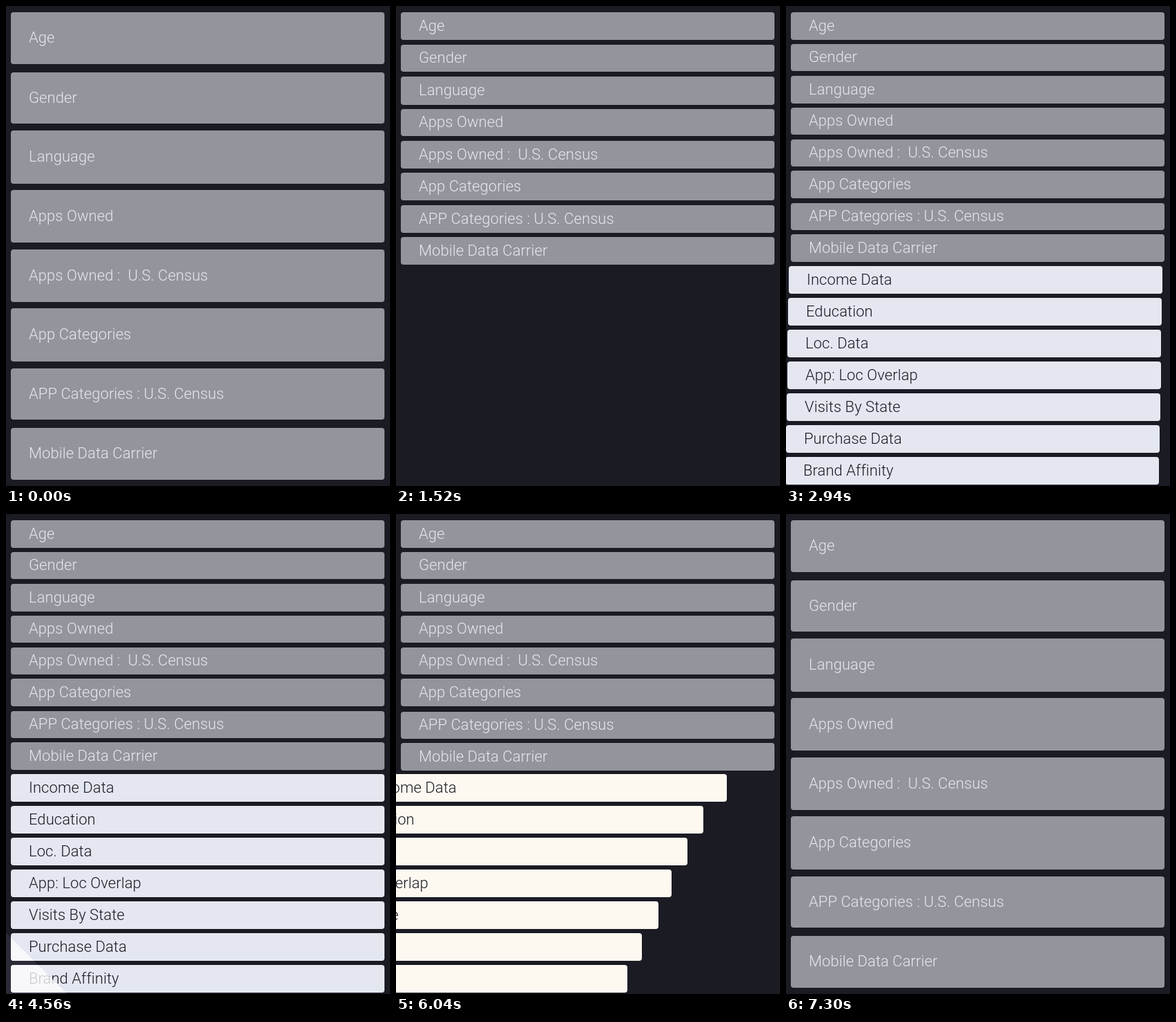
An HTML page with a canvas for the animation above (7.44 s loop, 556 by 694 pixels).

```html
<!DOCTYPE html>
<html lang="en">
<head>
<meta charset="utf-8">
<style>
html, body { margin: 0; height: 100%; overflow: hidden; background: #1b1b24; }
canvas { display: block; }
</style>
</head>
<body>
<canvas id="stage" width="556" height="694"></canvas>
<script>
const ctx = document.getElementById('stage').getContext('2d');
const LOOP = 7440, LEFT = 7, WIDTH = 541;
const BG = '#1b1b24', GREY = '#93959d', PALE = '#e4e7f0', CREAM = '#fdf8f0';

const basic = ['Age', 'Gender', 'Language', 'Apps Owned', 'Apps Owned :  U.S. Census',
  'App Categories', 'APP Categories : U.S. Census', 'Mobile Data Carrier'];
const extra = ['Income Data', 'Education', 'Loc. Data', 'App: Loc Overlap',
  'Visits By State', 'Purchase Data', 'Brand Affinity'];

// Row edges of the list, spread out and packed
const tall = { top: [9, 96, 180, 266, 352, 437, 524, 610], end: [84, 170, 257, 342, 428, 514, 598, 685] };
const tight = { top: [9, 55, 101, 147, 193, 238, 285, 330], end: [49, 94, 141, 186, 232, 278, 324, 370] };

// Distance each extra bar travels, in and out
const enterBy = extra.map((_, i) => 548 + 213 * i - 8 * i * (i - 1));
const leaveBy = [69, 103, 126, 149, 168, 192, 213];

const lerp = (a, b, k) => a + (b - a) * k;
const span = (t, a, b) => Math.min(1, Math.max(0, (t - a) / (b - a)));
const smooth = k => k * k * (3 - 2 * k);
const easeOut = k => 1 - (1 - k) ** 2;

// 1 = spread out, 0 = packed
function spread(t) {
  if (t < 1163) return lerp(1, 0.96, smooth(span(t, 410, 1040)));
  if (t < 6040) return lerp(0.96, 0, easeOut(span(t, 1163, 1570)));
  if (t < 6640) return lerp(0.0021, -0.0225, smooth(span(t, 6045, 6430)));
  return lerp(-0.0225, 1, easeOut(span(t, 6640, 7060)));
}

function bar(x, y, h, fill) {
  ctx.fillStyle = fill;
  ctx.beginPath();
  ctx.roundRect(x, y, WIDTH, h, 4);
  ctx.fill();
}

function label(text, x, y, h, color) {
  ctx.fillStyle = color;
  ctx.fillText(text, x + 26, y + h / 2 + 6.5);
}

function drawList(t) {
  const k = spread(t);
  basic.forEach((text, i) => {
    const y = Math.round(lerp(tight.top[i], tall.top[i], k));
    const h = Math.round(lerp(tight.end[i], tall.end[i], k)) - y;
    bar(LEFT, y, h, GREY);
    label(text, LEFT, y, h, '#e6e7ee');
  });
}

function drawExtra(t, fill, withText = true) {
  const rest = (1 - span(t, 1950, 2990)) ** 1.75;
  extra.forEach((text, i) => {
    const gone = t < 6040 ? enterBy[i] * rest : leaveBy[i] * (t - 5991) / 50;
    const x = Math.round(LEFT - gone), y = Math.round(376 + 46 * i - 4.5 * rest);
    bar(x, y, 40, fill);
    if (withText) label(text, x, y, 40, BG);
  });
}

// Draws only to the lower left of the diagonal x - y = d
function behind(d, draw) {
  ctx.save();
  ctx.beginPath();
  ctx.moveTo(d + 372, 372);
  ctx.lineTo(d + 694, 694);
  ctx.lineTo(-2000, 694);
  ctx.lineTo(-2000, 372);
  ctx.clip();
  draw();
  ctx.restore();
}

function drawSweep(t) {
  const edge = -610 + 4.5 * (t - 4560);
  behind(edge, () => {
    ctx.fillStyle = 'rgba(200,200,255,0.09)';
    ctx.fillRect(0, 372, 556, 322);
    drawExtra(t, 'rgba(255,255,255,0.75)', false);
  });
  behind(edge - 250, () => {
    ctx.fillStyle = BG;
    ctx.fillRect(0, 372, 556, 322);
    drawExtra(t, CREAM);
  });
}

function frame(now) {
  const t = now % LOOP;
  ctx.fillStyle = BG;
  ctx.fillRect(0, 0, 556, 694);
  ctx.font = '300 22px Roboto, "Open Sans", sans-serif';
  ctx.letterSpacing = '0.06px';
  drawList(t);
  if (t >= 1950 && t < 6430) drawExtra(t, t < 4790 ? PALE : CREAM);
  if (t >= 4560 && t < 4790) drawSweep(t);
}

const start = performance.now();
function tick() {
  frame(performance.now() - start);
  requestAnimationFrame(tick);
}
tick();
</script>
</body>
</html>
```
